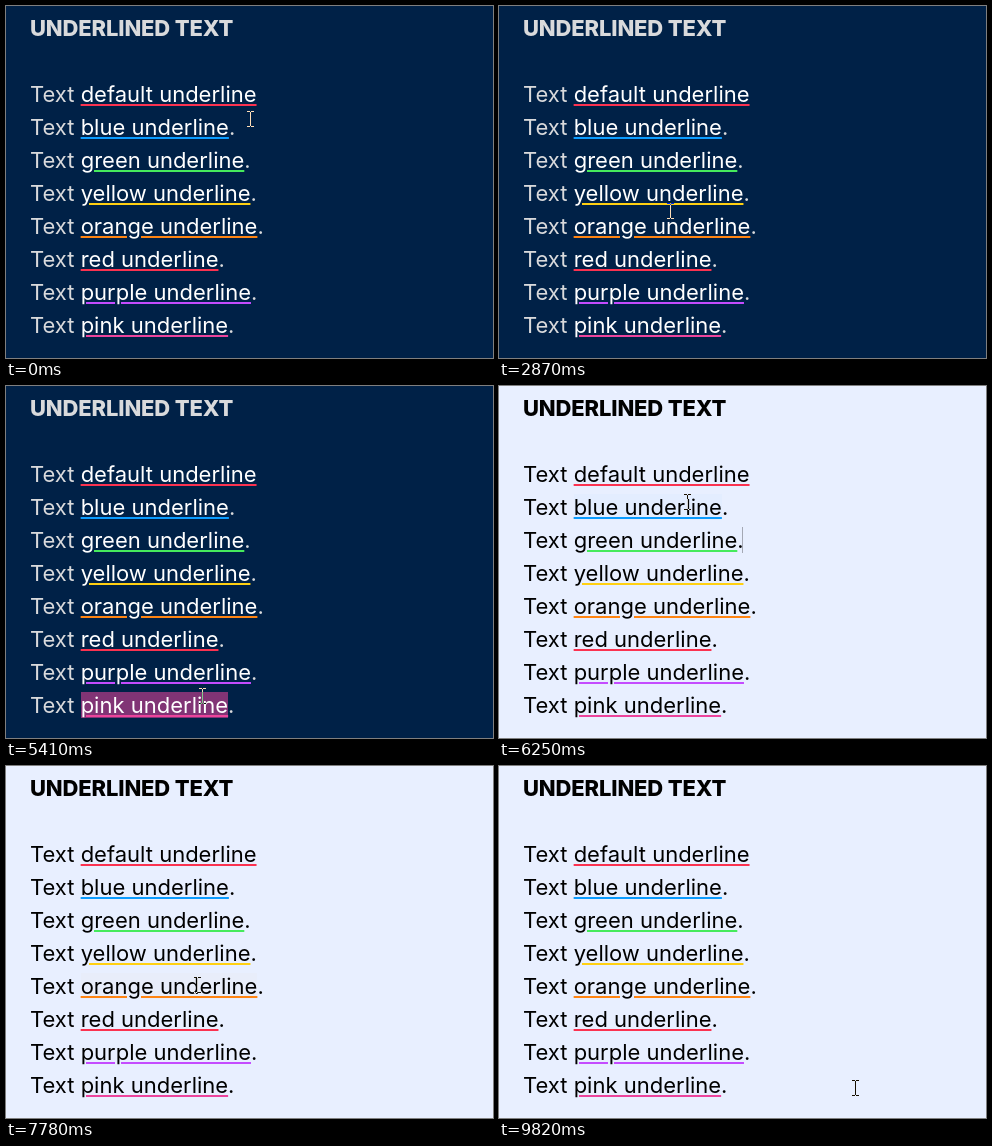
Animation, 487 px wide and 352 px high, one loop 9.9 s. Source, as an HTML page:

```html
<!DOCTYPE html>
<html lang="en">
<head>
<meta charset="utf-8">
<title>Underlined text</title>
<style>
html, body { margin: 0; width: 100%; height: 100%; overflow: hidden; }
body { position: relative; background: #002147; color: #d9dadc; font: 400 22px/33px Inter, sans-serif; }
body.light { background: #e8efff; color: #000; }
#page { position: absolute; left: 24px; top: 6px; white-space: pre; }
h1 { margin: 0 0 33px; font: 800 22px/33px Inter, sans-serif; letter-spacing: -.15px; }
u { color: #fff; text-decoration: underline 2px var(--line); text-underline-offset: 2px; }
.light u { color: #000; }
#caret { position: absolute; left: 243px; top: 141px; width: 1px; height: 26px; background: #a4a8b4; }
#mouse { position: absolute; left: 0; top: 0; mix-blend-mode: difference; }
</style>
</head>
<body>
<div id="page"><h1>UNDERLINED TEXT</h1></div>
<div id="caret"></div>
<svg id="mouse" width="9" height="17" shape-rendering="crispEdges" fill="none" stroke="#fff">
  <path d="M1 .5h3M5 .5h3M4.5 1v14M1 15.5h3M5 15.5h3"/>
</svg>
<script>
const LOOP = 9900, STEP = 169.2, LIGHT = 5580, TOP = 75, ROW = 33;
const lines = {
  default: "#fb3250", blue: "#0c9cff", green: "#46ea5c", yellow: "#ffd012",
  orange: "#ff8412", red: "#fb3250", purple: "#c44cff", pink: "#ec449c"
};
// time, x, y of the pointer: one sweep down the list per theme
const path = [
  [0, 244, 113], [680, 215, 90], [1860, 177, 164], [4050, 164, 256], [5410, 196, 310], [LIGHT, 196, 310],
  [LIGHT, 200, 90], [6250, 188, 116], [7780, 191, 219], [9140, 205, 318], [LOOP, 362, 322]
];
const $ = id => document.getElementById(id);

const marks = Object.entries(lines).map(([word, line], i) => {
  const row = document.createElement("div"), mark = document.createElement("u");
  mark.textContent = word + " underline";
  mark.style.setProperty("--line", line);
  row.append("Text ", mark, i ? "." : "");
  $("page").append(row);
  return mark;
});

function pointer(t) {
  const i = path.findIndex(p => p[0] > t), a = path[i - 1], b = path[i];
  const k = (t - a[0]) / (b[0] - a[0]), ease = k * k * (3 - 2 * k);
  return [1, 2].map(n => a[n] + (b[n] - a[n]) * ease);
}

function draw(now) {
  const t = Math.floor((now % LOOP + 10) / STEP) * STEP, light = t >= LIGHT;
  const [x, y] = pointer(Math.min(t, LOOP - 1));
  document.body.className = light ? "light" : "";
  marks.forEach((mark, i) => {
    const depth = y - TOP - ROW * i, box = mark.getBoundingClientRect();
    const hover = depth >= 0 && depth < 26 && x >= box.left && x < box.right;
    const tint = !hover ? 0 : light ? 2 : 13 + 6 * i;
    mark.style.background = `color-mix(in srgb, var(--line) ${tint}%, transparent)`;
  });
  $("caret").style.display = light && (t + 410) % 1060 < 530 ? "" : "none";
  $("mouse").style.transform = `translate(${Math.round(x) - 4}px, ${Math.round(y) - 8}px)`;
  requestAnimationFrame(draw);
}
requestAnimationFrame(draw);
</script>
</body>
</html>
```
